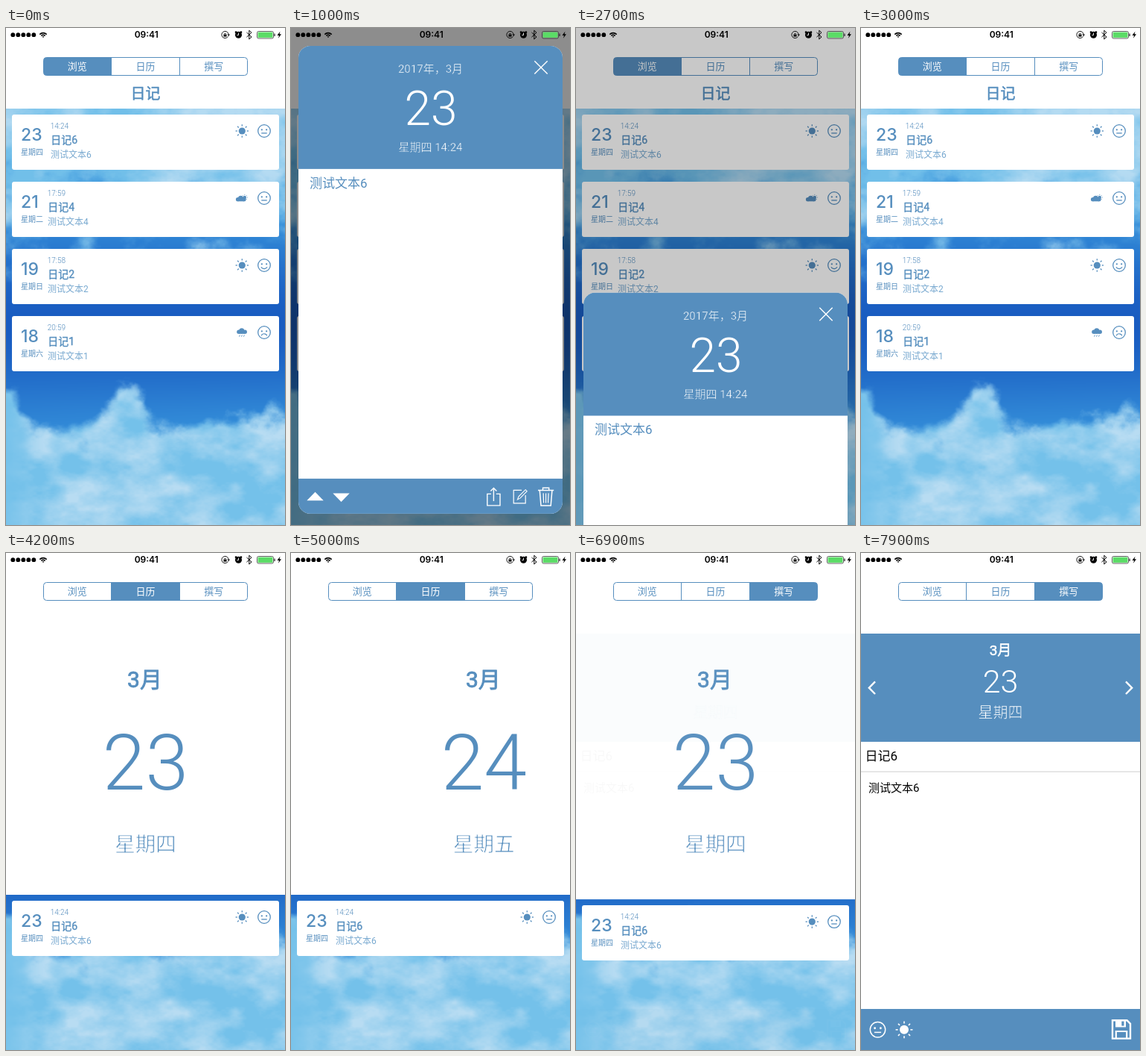
An HTML page with a canvas that plays this animation: 375 px wide and 666 px high, repeating every 8000 ms.

```html
<!DOCTYPE html>
<html lang="zh-CN">
<head>
<meta charset="utf-8">
<title>日记</title>
<style>
html, body { margin: 0; width: 100%; height: 100%; overflow: hidden; background: #fff; }
canvas { display: block; width: 375px; height: 666px; }
</style>
</head>
<body>
<canvas id="stage"></canvas>
<script>
const W = 375, H = 666, MID = W / 2, LOOP = 8000, TAU = Math.PI * 2;
const BLUE = '#568ebe', PALE = '#78a9d0', WHITE = '#fff', BLACK = '#000';
const FONT = 'Roboto, "Noto Sans CJK SC", "Noto Sans CJK", sans-serif';
const UI = 'Inter, sans-serif';
const canvas = document.getElementById('stage');
const c = canvas.getContext('2d');
const dpr = window.devicePixelRatio || 1;
canvas.width = W * dpr;
canvas.height = H * dpr;

// timing helpers
const clamp = v => Math.max(0, Math.min(1, v));
const span = (t, start, dur) => clamp((t - start) / dur);
const smooth = u => u * u * (3 - 2 * u);
const easeOut = u => 1 - (1 - u) ** 3;
const mix = (a, b, u) => a + (b - a) * u;
const spring = (t, start, w) => {
  const s = Math.max(0, t - start) / 1000 * w;
  return 1 - (1 + s) * Math.exp(-s);
};

// drawing helpers; an edge in the text colour makes it bolder, in the paper colour lighter
function text(str, x, y, size, color, { weight = 400, align = 'left', font = FONT, edge } = {}) {
  c.font = `${weight} ${size}px ${font}`;
  c.fillStyle = color;
  c.textAlign = align;
  c.fillText(str, x, y);
  if (!edge) return;
  c.lineJoin = 'round';
  c.lineWidth = size * 0.028;
  c.strokeStyle = edge;
  c.strokeText(str, x, y);
  c.lineJoin = 'miter';
}
const center = (str, x, y, size, color, opts) => text(str, x, y, size, color, { align: 'center', ...opts });

function rect(x, y, w, h, color) {
  c.fillStyle = color;
  c.fillRect(x, y, w, h);
}
function round(x, y, w, h, r) {
  c.beginPath();
  c.roundRect(x, y, w, h, r);
}
function dot(x, y, r, color) {
  c.beginPath();
  c.arc(x, y, r, 0, TAU);
  c.fillStyle = color;
  c.fill();
}
function ring(x, y, r, color, width, from = 0, to = TAU) {
  c.beginPath();
  c.arc(x, y, r, from, to);
  c.strokeStyle = color;
  c.lineWidth = width;
  c.stroke();
}
function path(points, closed) {
  c.beginPath();
  for (let i = 0; i < points.length; i += 2) c.lineTo(points[i], points[i + 1]);
  if (closed) c.closePath();
}
function line(points, color, width, closed) {
  path(points, closed);
  c.strokeStyle = color;
  c.lineWidth = width;
  c.stroke();
}
function poly(points, color) {
  path(points, true);
  c.fillStyle = color;
  c.fill();
}
function at(x, y, draw) {
  c.save();
  c.translate(x, y);
  draw();
  c.restore();
}
function faded(alpha, draw) {
  if (alpha <= 0) return;
  c.save();
  c.globalAlpha *= alpha;
  draw();
  c.restore();
}

// seeded fractal noise
function hash(i, j) {
  let n = Math.imul(i, 374761393) + Math.imul(j, 668265263);
  n = Math.imul(n ^ (n >>> 13), 1274126177);
  return ((n ^ (n >>> 16)) >>> 0) / 4294967296;
}
function noise(x, y) {
  const i = Math.floor(x), j = Math.floor(y);
  const u = smooth(x - i), v = smooth(y - j);
  return mix(mix(hash(i, j), hash(i + 1, j), u), mix(hash(i, j + 1), hash(i + 1, j + 1), u), v);
}
function fbm(x, y) {
  let sum = 0;
  for (let k = 0, amp = 0.5; k < 5; k++, amp /= 2) {
    sum += amp * (noise(x + k * 17, y + k * 31) - 0.5);
    x *= 2; y *= 2;
  }
  return sum;
}

// the sky is built once: deep blue in the middle, a cloud bank below, haze above
const bump = (x, at, width) => Math.exp(-(((x - at) / width) ** 2));
const bankTop = x => 545 - 52 * bump(x, 0, 24) - 64 * bump(x, 160, 34) - 24 * bump(x, 340, 75);
const shades = { deep: [25, 92, 193], clear: [58, 154, 223], haze: [116, 193, 234], light: [184, 220, 242] };
function makeSky() {
  const el = document.createElement('canvas');
  el.width = W;
  el.height = H;
  const g = el.getContext('2d');
  const img = g.createImageData(W, H);
  for (let y = 100; y < H; y++) {
    const clear = smooth(clamp(Math.abs(y - 395) / 190));
    for (let x = 0; x < W; x++) {
      const depth = y - bankTop(x);
      const rough = fbm(x / 36, y / 30), soft = fbm(x / 44 + 90, y / 28 + 40);
      const bank = smooth(clamp(0.5 + depth / 30 + rough * 2.2));
      const veil = smooth(clamp((325 - y) / 130 - 0.1 + rough * 1.6));
      const rim = 0.3 * Math.exp(-Math.max(0, depth) / 35);
      const glow = clamp(0.35 + rim + soft * 2.2) * smooth(clamp((x + 15) / 75));
      const cover = Math.max(bank, veil * 0.95);
      const lit = cover * (y > 400 ? glow : clamp(0.25 + 0.5 * x / W + soft * 2));
      const tint = clear * (0.85 + 0.15 * x / W);
      const p = (y * W + x) * 4;
      for (let n = 0; n < 3; n++) {
        const blue = mix(shades.deep[n], shades.clear[n], tint);
        img.data[p + n] = mix(mix(blue, shades.haze[n], cover), shades.light[n], lit);
      }
      img.data[p + 3] = 255;
    }
  }
  g.putImageData(img, 0, 0);
  return el;
}
const sky = makeSky();

// icons
function sun(x, y, r, color, width) {
  dot(x, y, r, color);
  for (let k = 0; k < 8; k++) {
    const dx = r * Math.cos(k * TAU / 8), dy = r * Math.sin(k * TAU / 8);
    line([x + dx * 1.4, y + dy * 1.4, x + dx * 1.9, y + dy * 1.9], color, width);
  }
}
function cloud(x, y) {
  dot(x - 4.5, y + 1.2, 2.6, BLUE);
  dot(x - 0.5, y - 0.2, 3.6, BLUE);
  dot(x + 4, y + 1.2, 2.6, BLUE);
  rect(x - 4.5, y, 8.5, 3.8, BLUE);
}
function weather(kind, x, y) {
  if (kind === 'sun') sun(x, y, 4.6, BLUE, 1.3);
  if (kind === 'partly') {
    sun(x + 3.5, y - 1, 2.2, BLUE, 0.8);
    cloud(x - 1.3, y + 0.5);
  }
  if (kind === 'rain') {
    cloud(x, y - 2);
    for (const dx of [-3, 0, 3]) line([x + dx, y + 3.5, x + dx - 0.8, y + 5.5], BLUE, 1);
  }
}
function face(mood, x, y, r, color, width) {
  ring(x, y, r, color, width);
  for (const side of [-1, 1]) dot(x + side * r * 0.38, y - r * 0.2, r * 0.14, color);
  if (mood > 0) ring(x, y, r * 0.55, color, width, 0.5, Math.PI - 0.5);
  else if (mood < 0) ring(x, y + r * 0.72, r * 0.5, color, width, Math.PI + 0.4, TAU - 0.4);
  else line([x - r * 0.45, y + r * 0.35, x + r * 0.45, y + r * 0.35], color, width);
}
function chevron(x, y, dir) {
  line([x, y - 8.3, x + dir * 8.2, y, x, y + 8.3], WHITE, 2.4);
}
function triangle(x, y, dir) {
  poly([x - 11.2, y - dir * 5.7, x + 11.2, y - dir * 5.7, x, y + dir * 5.7], WHITE);
}

function statusBar() {
  for (let k = 0; k < 5; k++) dot(9.3 + k * 7, 9.2, 2.9, BLACK);
  for (const r of [1, 3.6, 6.4]) ring(50, 13, r, BLACK, 1.6, -Math.PI * 0.76, -Math.PI * 0.24);
  center('09:41', 188.7, 13, 12, BLACK, { weight: 600, font: UI });
  at(294.5, 9, () => {
    ring(0, 0, 4.6, BLACK, 0.9, 0.5, TAU - 0.1);
    poly([3, -0.5, 6.5, -0.5, 4.7, 2], BLACK);
    rect(-2, -0.4, 4, 3, BLACK);
    ring(0, -0.5, 1.3, BLACK, 0.8, Math.PI, TAU);
  });
  at(312.5, 9.3, () => {
    dot(0, 0, 4.5, BLACK);
    for (const side of [-1, 1]) dot(side * 3.4, -3.6, 1.4, BLACK);
    line([0, -2.8, 0, 0.2, -2.1, 0.2], WHITE, 0.9);
  });
  at(326.8, 9.1, () => line([-3.3, -3.1, 3.2, 2.9, 0, 5.9, 0, -5.9, 3.2, -2.9, -3.3, 3.1], BLACK, 1));
  round(337.5, 4.5, 22, 9.5, 2);
  c.strokeStyle = '#3a3a3a';
  c.lineWidth = 0.8;
  c.stroke();
  rect(338.6, 5.6, 19.8, 7.3, '#5bdc66');
  rect(360.4, 7.5, 1.3, 3.5, '#333');
  at(367.2, 9, () => poly([1.3, -4.5, -2.7, 1, -0.2, 1, -1.2, 4.8, 2.8, -0.7, 0.3, -0.7], BLACK));
}

function segments(active) {
  const edges = [50, 141.5, 233.5, 325];
  c.save();
  round(50.5, 39.5, 274, 24, 4);
  c.clip();
  ['浏览', '日历', '撰写'].forEach((label, k) => {
    const x = edges[k], w = edges[k + 1] - x;
    if (k === active) rect(x, 39, w, 26, BLUE);
    if (k) line([x, 39, x, 65], BLUE, 1);
    center(label, x + w / 2, 56.2, 13, k === active ? WHITE : BLUE);
  });
  c.restore();
  round(50.5, 39.5, 274, 24, 4);
  c.strokeStyle = BLUE;
  c.lineWidth = 1;
  c.stroke();
}

const entries = [
  { day: '23', week: '星期四', time: '14:24', n: 6, sky: 'sun', mood: 0, x: 60 },
  { day: '21', week: '星期二', time: '17:59', n: 4, sky: 'partly', mood: 0, x: 56 },
  { day: '19', week: '星期日', time: '17:58', n: 2, sky: 'sun', mood: 1, x: 56 },
  { day: '18', week: '星期六', time: '20:59', n: 1, sky: 'rain', mood: -1, x: 56 }
];
function card(e, y) {
  round(8, y, 359, 74, 3);
  c.fillStyle = WHITE;
  c.fill();
  text(e.day, 20, y + 35, 23, BLUE, { weight: 500, font: UI });
  text(e.week, 20, y + 54.3, 10, BLUE);
  text(e.time, e.x - 0.3, y + 18.8, 10, BLUE, { weight: 300 });
  text('日记' + e.n, e.x + 0.3, y + 38.6, 14, BLUE, { edge: BLUE });
  text('测试文本' + e.n, e.x, y + 57.6, 12, PALE);
  weather(e.sky, 317.3, y + 22);
  face(e.mood, 347, y + 22, 8.3, BLUE, 1.3);
}

function datePage(day, week, x) {
  if (Math.abs(x - MID) >= W) return;
  center('3月', x - 1, 180, 30, BLUE, { edge: BLUE });
  center(day, x, 316.7, 104, BLUE, { weight: 300 });
  center(week, x, 399.5, 27.5, BLUE, { edge: WHITE });
}
function calendar(t) {
  const page = smooth(span(t, 4400, 835)) - easeOut(span(t, 5740, 530));
  datePage('23', '星期四', MID - page * W);
  datePage('24', '星期五', MID + (1 - page) * W);
}

function compose() {
  rect(0, 108, W, 145, BLUE);
  center('3月', MID, 137, 19, WHITE, { edge: WHITE });
  center('23', MID, 187, 43, WHITE, { weight: 300 });
  center('星期四', MID, 221, 20, WHITE, { edge: BLUE });
  chevron(19, 180.7, -1);
  chevron(356, 180.7, 1);
  text('日记6', 5.5, 278, 17, BLACK);
  rect(0, 292.4, W, 1.3, '#d9d9d9');
  text('测试文本6', 10, 320.3, 15, BLACK);
  rect(0, 611, W, 55, BLUE);
  face(0, 22.5, 638.8, 10.2, WHITE, 1.5);
  sun(58, 638.8, 6, WHITE, 1.6);
  at(350, 638.4, () => {
    line([-12, -12.2, 7.5, -12.2, 12, -7.6, 12, 12.2, -12, 12.2], WHITE, 2.4, true);
    line([-7.2, 12, -7.2, 2.6, 7.2, 2.6, 7.2, 12], WHITE, 2.2);
    rect(-8, -12, 14, 9, WHITE);
    rect(0.3, -10.8, 3.2, 6, BLUE);
  });
}

function modal(top) {
  c.save();
  c.translate(0, top);
  round(10, 0, 355, 627, 16);
  c.clip();
  rect(10, 0, 355, 627, WHITE);
  rect(10, 0, 355, 165, BLUE);
  rect(10, 580, 355, 47, BLUE);
  center('2017年，3月', MID, 36.3, 15, WHITE, { edge: BLUE });
  center('23', 188, 106, 64, WHITE, { weight: 300 });
  center('星期四 14:24', MID, 141, 15, WHITE, { edge: BLUE });
  for (const side of [-1, 1]) line([336 - side * 8.7, 20.3, 336 + side * 8.7, 37.7], WHITE, 1.4);
  text('测试文本6', 25, 189.8, 17, BLUE);
  triangle(32.5, 603.6, -1);
  triangle(67.5, 605.3, 1);
  at(272.4, 604, () => { // share
    line([-3.4, -3.5, -8.6, -3.5, -8.6, 12, 8.6, 12, 8.6, -3.5, 3.4, -3.5], WHITE, 1.4);
    line([0, 6, 0, -11], WHITE, 1.4);
    line([-4, -7.4, 0, -11.4, 4, -7.4], WHITE, 1.4);
  });
  at(307.2, 604, () => { // edit
    line([2.8, -8.5, -8, -8.5, -8, 9, 8, 9, 8, -2], WHITE, 1.2);
    line([-2.7, 4, -1.2, 0, 8, -9.2, 10, -7.2, 1, 2], WHITE, 1.1, true);
  });
  at(342.6, 604, () => { // trash
    line([-10.6, -8.5, 10.6, -8.5], WHITE, 1.5);
    line([-4.1, -9, -4.1, -11.7, 4.1, -11.7, 4.1, -9], WHITE, 1.4);
    line([-8.3, -8, -6.6, 12, 6.6, 12, 8.3, -8], WHITE, 1.5);
    for (const dx of [-3.5, 0, 3.5]) line([dx, -4.5, dx * 0.85, 8.5], WHITE, 1.2);
  });
  c.restore();
}

function draw(t) {
  c.setTransform(dpr, 0, 0, dpr, 0, 0);
  c.globalAlpha = 1;
  c.drawImage(sky, 0, 0);

  const toCal = smooth(span(t, 3460, 480));
  const toEdit = smooth(span(t, 6860, 400));
  const edge = 108 + 350 * toCal + 208 * toEdit;

  const first = 1 - smooth(span(t, 5270, 300)) + smooth(span(t, 6290, 300));
  entries.forEach((e, k) => {
    faded(k ? 1 - span(toCal, 0, 0.6) : first, () => card(e, edge + 8 + 90 * k));
  });

  rect(0, 0, W, edge, WHITE);
  c.save();
  c.beginPath();
  c.rect(0, 0, W, edge);
  c.clip();
  faded(1 - span(toCal, 0, 0.7), () => center('日记', MID, 94.5, 20, BLUE, { edge: BLUE }));
  faded(toCal * (1 - toEdit), () => calendar(t));
  c.restore();
  faded(toEdit, compose);
  segments(t < 3460 ? 0 : t < 6860 ? 1 : 2);

  const shown = spring(t, 680, 22.5) - smooth(span(t, 2400, 588));
  if (t > 680 && t < 2988) {
    rect(0, 0, W, H, `rgba(0,0,0,${0.45 * clamp(shown)})`);
    modal(mix(H, 20, shown));
  }
  statusBar();
}

function tick() {
  draw(performance.now() % LOOP);
  requestAnimationFrame(tick);
}
tick();
</script>
</body>
</html>
```
